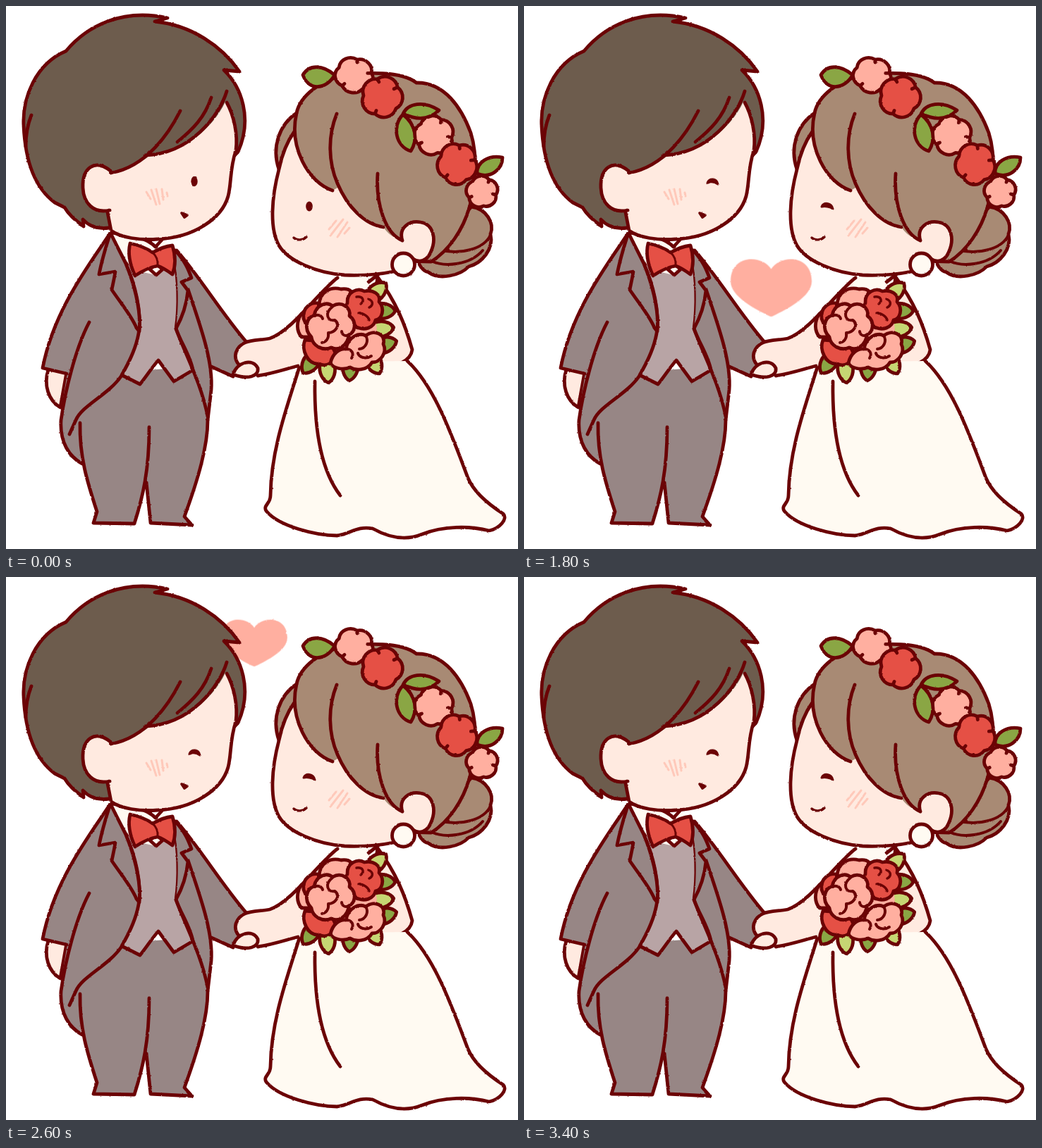
An HTML page that plays this animation: 726x771 px, repeating every 3600 ms.

```html
<!DOCTYPE html>
<html lang="en">
<head>
<meta charset="utf-8">
<title>Wedding couple</title>
<style>
html, body { margin: 0; width: 100%; height: 100%; overflow: hidden; background: #fff; }
svg { display: block; width: 100vw; height: 100vh; }
.ink { stroke: #6b0305; stroke-width: 4.8; stroke-linecap: round; stroke-linejoin: round; }
.line { fill: none; }
.bare { stroke: none; }
.skin { fill: #ffeae0; }
.suit { fill: #978685; }
.vest { fill: #b8a4a5; }
.dark { fill: #6d5c4d; }
.brown { fill: #a88a74; }
.cream { fill: #fffaf2; }
.pink { fill: #ffafa0; }
.red { fill: #e55045; }
.green { fill: #8aa644; }
.lime { fill: #c6d673; }
.dot { fill: #6b0305; stroke: none; }
.lid { fill: #6b0305; stroke-width: 3; }
.blush { fill: none; stroke: #ffc9ba; stroke-width: 3; stroke-linecap: round; }
#bloom, #leaf { vector-effect: non-scaling-stroke; }

.sway, .open, .shut, .heart { animation: 3600ms step-end infinite; }
.sway { animation-name: sway; }
.open { animation-name: open; }
.shut { animation-name: shut; }
.heart { animation-name: rise; }
.his-head { --pose: translate(2px, 2px) rotate(2deg); transform-origin: 205px 330px; }
.his-arm { --pose: translate(1px, 3px); }
.her-head { --pose: translate(-.5px, 2.5px) rotate(-1deg); transform-origin: 520px 370px; }
.her-arm { --pose: translate(-6px, 3px) rotate(-5deg); transform-origin: 440px 430px; }
.her-elbow { --pose: translate(3px, 3px); }
.bouquet { --pose: translate(3px, 2px) rotate(-1.5deg); transform-origin: 485px 465px; }

@keyframes sway { 0%, 50% { transform: none; } 33.333% { transform: var(--pose); } }
@keyframes open { 0% { visibility: visible; } 16.666%, 100% { visibility: hidden; } }
@keyframes shut { 0% { visibility: hidden; } 16.666%, 100% { visibility: visible; } }
@keyframes rise {
  0%, 83.333%, 100% { visibility: hidden; }
  50% { visibility: visible; transform: translate(350.5px, 400.5px); }
  55.555% { visibility: visible; transform: translate(350.5px, 366px) scale(.81); }
  61.111% { visibility: visible; transform: translate(351px, 262px); }
  66.666% { visibility: visible; transform: translate(352px, 210px) scale(.77); }
  72.222% { visibility: visible; transform: translate(352px, 94px) scale(.815); }
  77.777% { visibility: visible; transform: translate(352.5px, 52px) scale(.585); }
}
</style>
</head>
<body>
<svg viewBox="0 0 726 771">
<defs>
  <filter id="rough" filterUnits="userSpaceOnUse" x="0" y="0" width="726" height="771" color-interpolation-filters="sRGB">
    <feTurbulence type="fractalNoise" baseFrequency=".22" numOctaves="2" seed="4"/>
    <feDisplacementMap in="SourceGraphic" scale="2" xChannelSelector="R" yChannelSelector="G"/>
  </filter>
  <path id="bloom" d="M0-23A16 16 0 0 1 22-7A16 16 0 0 1 13.5 18.6A16 16 0 0 1-13.5 18.6A16 16 0 0 1-22-7A16 16 0 0 1 0-23L1-19M22-7L17-6M-13.5 18.6L-11 15"/>
  <path id="leaf" d="M0-10C12-13 23-8 27 0C23 8 12 13 0 10Z"/>
</defs>
<g filter="url(#rough)">
<path class="heart pink" d="M0-27C12-47 57-49 57.5-10C58 12 22 30 3 39.5Q0 41.5-3 39.5C-22 30-58 12-57.5-10C-57-49-12-47 0-27Z"/>

<g class="ink">
  <!-- groom: legs and coat -->
  <path class="skin" d="M60 516C53 538 60 560 77 570L86 520Z"/>
  <path class="suit bare" d="M104 575L163 520L265 512L290 560C288 615 272 670 252 725L262 736L205 734L199 674C196 695 189 715 182 735L125 735L129 718C115 670 103 640 104 575Z"/>
  <path class="suit bare" d="M148 322C115 370 75 425 52 514L87 522C82 550 78 575 78 600L90 640L106 648L104 580L163 525L190 530L216 503L242 530L262 515L287 585L292 515L270 410L240 345Z"/>
  <path class="line" d="M105 592C104 640 115 675 129 718L124 734L182 735C194 697 203 660 203 598M199 676L205 734L264 737M262 735L253 725C273 670 286 625 286 588"/>

  <g class="his-arm sway">
    <path class="suit bare" d="M240 345C275 385 310 440 340 476L332 510L322 528L291 513L260 400Z"/>
    <path class="line" d="M242 347C275 385 305 435 340 476M291 512L322 526"/>
  </g>

  <path class="line" d="M148 322C120 365 68 430 52 514L86 522M118 449C99 485 84 545 78 588C76 620 90 640 108 650M163 526C145 552 108 567 99 588L90 608"/>
  <path class="line" d="M258 402C276 455 294 505 291 545L286 588"/>
  <path class="vest" d="M170 366C183 395 193 435 188 465C184 488 174 507 164 524L190 537C199 526 207 513 216 503L238 533L265 517C262 498 248 478 241 458C246 425 244 385 239 362Z"/>
  <path class="cream bare" d="M150 323L212 338L222 332L238 347L212 382L178 374Z"/>
  <path class="suit" d="M148 322C139 350 135 365 132 381L155 377C153 390 151 397 150 403C165 425 178 440 185 457L189 462C192 430 180 390 170 366Z"/>
  <path class="suit bare" d="M240 347L239 362C245 390 245 430 241 458C250 440 256 422 258 404L263 388Z"/>
  <path class="line" d="M240 347C254 362 259 375 263 386L249 392L258 404C256 424 250 442 241 458"/>
  <path class="line" d="M241 458C252 490 277 535 286 583M148 322C172 323 198 328 212 342L222 331"/>
  <path class="cream" d="M204 374L213 382L222 374L213 366Z"/>
  <path class="red" d="M176 337C190 340 201 345 208 350C218 344 227 341 236 340C240 353 241 368 236 381C229 376 222 371 215 369C202 371 192 377 183 383C176 368 172 353 176 337Z"/>
  <path class="line" d="M208 350C213 355 216 360 215 368" stroke-width="3"/>

  <!-- groom: head -->
  <g class="his-head sway">
    <path class="dark" d="M146 315C130 317 118 313 109 303L110 313C100 305 90 298 83 286L69 279C38 256 27 215 25 170C23 130 42 82 85 64C115 28 165 3 229 17L211 22C263 27 306 57 331 93L309 91C334 115 350 160 329 207L260 280Z"/>
    <path class="skin bare" d="M149 238C174 230 192 222 204 212C249 209 293 175 311 136C323 155 329 180 326 205C317 232 320 250 315 270C306 302 266 329 215 331C190 333 163 329 149 319L145 292C124 292 110 281 109 258C108 228 128 217 149 238Z"/>
    <path class="line" d="M313 121C303 155 262 210 197 212M313 137C323 155 329 182 326 205C317 232 320 250 315 270C306 302 266 329 215 331C190 333 163 329 149 319L144 293M147 290C124 295 110 280 109 258C108 230 126 216 148 234M247 149C232 179 200 228 149 237M291 130C282 158 265 175 243 193M36 155C29 172 28 187 28 200"/>
    <path class="blush" d="M199 264L205 274M206 261L213 282M213 260L218 281M221 260L223 275M228 265L229 270"/>
    <path class="line" d="M249 294L253 300L257 297Z" stroke-width="3.6"/>
    <ellipse class="dot open" cx="267" cy="249" rx="4.7" ry="7.2"/>
    <path class="lid shut" d="M260 251C263 244 273 244 275 253C271 250 265 249 260 251Z"/>
  </g>

  <!-- bride: body -->
  <path class="cream bare" d="M471 380L526 380L560 450L570 506L418 506L430 420Z"/>
  <g class="her-elbow sway">
    <path class="skin" d="M527 385C553 420 566 452 576 488C574 505 553 511 532 516L520 430Z"/>
    <path class="line" d="M514 392L528 381"/>
  </g>
  <path class="cream" d="M418 506C402 560 376 625 375 695C375 707 364 709 369 717C387 739 440 752 470 752C489 749 498 738 520 742C545 756 568 759 590 750C620 738 658 738 685 745C700 742 712 728 705 721C688 710 664 692 655 670C633 612 608 540 569 504"/>
  <path class="line" d="M438 533C437 600 447 660 474 695"/>
  <g class="her-arm sway">
    <path class="skin bare" d="M470 386C450 400 405 462 374 472C354 476 333 472 326 492L329 508L357 526C378 523 400 516 425 509Z"/>
    <path class="line" d="M470 386C447 402 405 462 374 472C354 476 333 472 326 492C324 500 327 506 331 510M357 525C378 522 398 515 414 511"/>
    <path class="skin" d="M322 523C328 505 350 500 357 514C359 526 342 531 322 523Z"/>
  </g>

  <!-- bouquet -->
  <g class="bouquet sway">
    <use href="#leaf" class="lime" transform="translate(519 412) rotate(-43)"/>
    <use href="#leaf" class="green" transform="translate(525 433)"/>
    <use href="#leaf" class="lime" transform="translate(523 460) rotate(-8)"/>
    <use href="#leaf" class="green" transform="translate(528 484) rotate(-18)"/>
    <use href="#leaf" class="lime" transform="translate(517 498) rotate(62)"/>
    <use href="#leaf" class="green" transform="translate(489 505) rotate(95)"/>
    <use href="#leaf" class="lime" transform="translate(455 508) rotate(85)"/>
    <use href="#leaf" class="green" transform="translate(437 499) rotate(125)"/>
    <ellipse class="pink bare" cx="482" cy="460" rx="44" ry="40"/>
    <path class="pink" d="M419 437C411 448 412 462 419 470L434 470L430 444Z"/>
    <path class="red" d="M422 444C420 428 433 418 447 423L442 450L428 458Z"/>
    <path class="pink" d="M444 424C445 406 460 398 475 402C489 400 494 408 492 417L480 432Z"/>
    <path class="red" d="M424 474C418 488 428 510 444 508C456 514 466 504 468 495L460 477Z"/>
    <path class="red" d="M484 422C483 405 499 400 508 405C521 402 532 410 529 420C538 430 533 445 524 446C521 458 508 460 500 457C491 456 492 448 489 443C482 436 480 428 484 422Z"/>
    <path class="line" d="M497 413C506 412 509 418 503 423M514 416C521 419 521 425 515 428M500 436C507 436 514 441 515 446" stroke-width="3.5"/>
    <path class="pink" d="M460 507C463 493 473 486 482 487C485 470 500 463 510 468C523 458 539 467 535 480C541 492 531 506 519 506C512 518 495 518 488 513C478 517 464 515 460 507Z"/>
    <path class="line" d="M482 487C490 487 494 493 490 500M510 468C515 476 510 486 501 487M518 497C510 502 501 499 499 493" stroke-width="4"/>
    <path class="pink" d="M433 470C421 458 427 442 437 439C440 424 455 419 463 426C476 418 490 429 487 440C499 449 494 464 486 467C485 482 471 490 461 485C449 490 435 483 433 470Z"/>
    <path class="line" d="M463 427C451 436 456 448 466 446C476 453 466 464 457 464C458 472 454 477 448 478M438 440C442 437 448 440 449 444M486 467C481 470 476 466 476 462" stroke-width="4"/>
  </g>

  <!-- bride: head -->
  <g class="her-head sway">
    <path class="brown" d="M660 285C681 288 693 308 687 324C692 345 675 365 656 370C645 382 615 390 599 378C593 377 588 371 585 365L620 330Z"/>
    <path class="line" d="M687 325C678 345 645 354 613 346M676 347C658 368 622 371 603 362M627 346L622 339" stroke-width="4"/>
    <path class="brown" d="M387 232C376 200 388 168 412 152C417 127 448 104 480 99C510 94 560 92 582 109C622 108 646 145 659 180C670 215 665 262 657 286C648 318 628 347 603 363L500 360Z"/>
    <path class="skin bare" d="M409 178C407 215 434 250 463 262L472 257C485 287 508 310 535 314C541 323 550 330 562 333C560 312 573 305 587 307C606 310 611 331 602 350C597 363 585 366 577 359L552 376C530 382 505 383 480 382C440 379 400 362 387 340C373 315 377 270 387 232C391 210 400 192 409 178Z"/>
    <path class="line" d="M412 152C401 200 428 250 463 262M409 178C399 192 391 212 387 232C377 270 373 315 387 340C400 362 440 379 480 382C505 383 530 381 550 377M469 153C456 185 457 222 470 252C484 285 508 310 535 314M527 238C524 282 538 323 562 333M562 333C556 314 573 304 588 307C606 310 611 331 602 350C597 362 586 365 577 359"/>
    <circle class="cream" cx="563.5" cy="367" r="16"/>
    <path class="blush" d="M458 317L468 305M460 326L478 303M470 328L484 307M480 323L487 315"/>
    <path class="line" d="M408 329C412 333 421 333 426 328" stroke-width="3.4"/>
    <ellipse class="dot open" cx="430" cy="284.5" rx="4.8" ry="7"/>
    <path class="lid shut" d="M422 285C425 278 436 279 438 288C434 285 427 284 422 285Z"/>

    <path class="green" d="M421 98C430 82 450 84 466 98C455 118 430 122 421 98Z"/>
    <use href="#bloom" class="pink" transform="translate(494 98) rotate(10) scale(1.06 .97)"/>
    <use href="#bloom" class="red" transform="translate(533 129) rotate(-14) scale(1.13 1.13)"/>
    <use href="#bloom" class="pink" transform="translate(607 184) rotate(24) scale(1.08)"/>
    <path class="green" d="M563 153C570 138 592 134 614 148C601 161 584 163 563 153Z"/>
    <path class="green" d="M563 154C547 170 552 199 574 206C584 190 582 169 563 154Z"/>
    <path class="green" d="M668 238C667 222 684 211 704 215C704 231 688 246 668 238Z"/>
    <use href="#bloom" class="pink" transform="translate(675 264) rotate(30) scale(.87)"/>
    <use href="#bloom" class="red" transform="translate(640 224) rotate(6) scale(1.1 1.14)"/>
  </g>
</g>
</g>
</svg>
</body>
</html>
```
